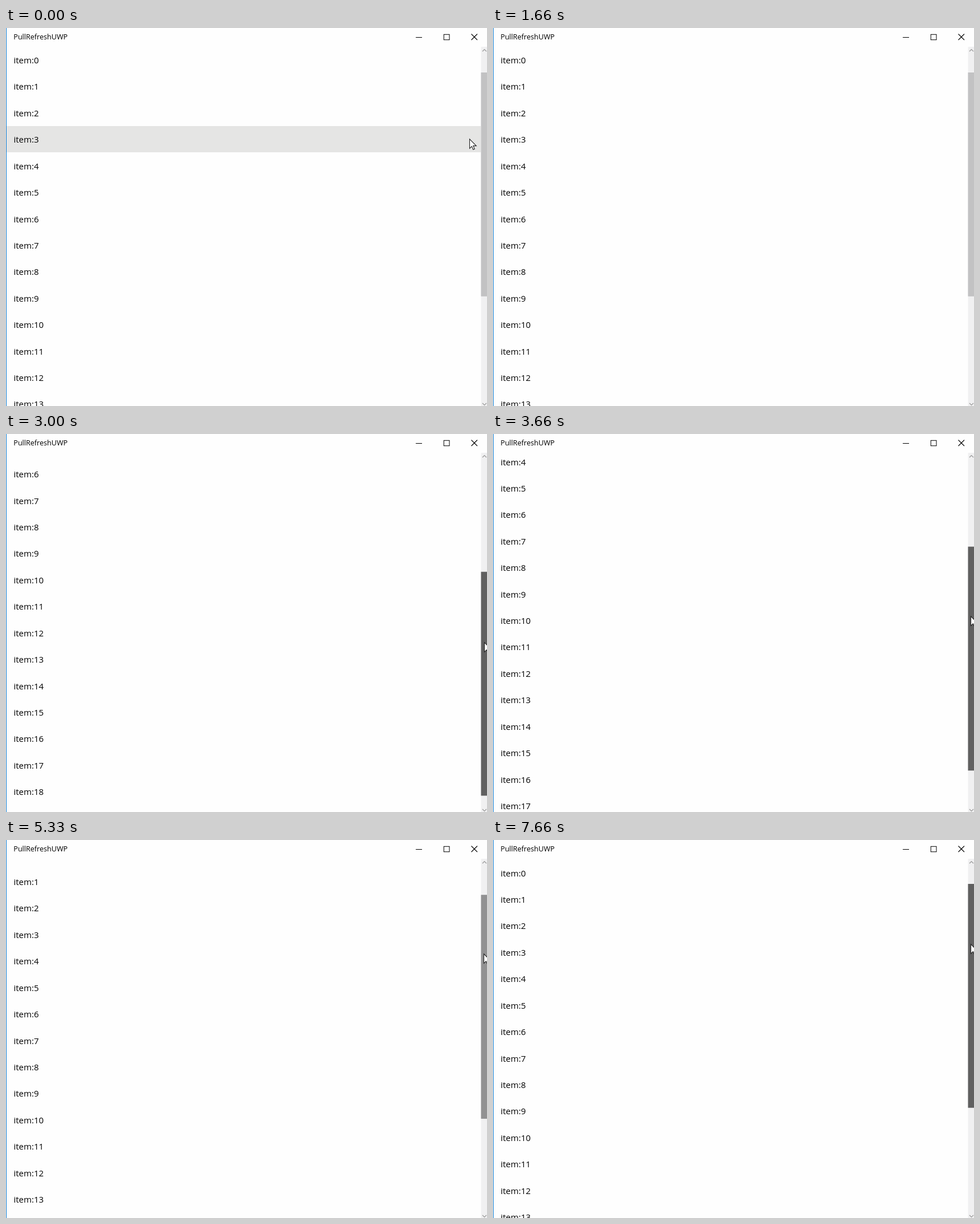
An HTML page with a canvas for the animation above (8000 ms loop, 844x663 px).

```html
<!DOCTYPE html>
<html lang="en">
<head>
<meta charset="utf-8">
<title>PullRefreshUWP</title>
<style>
html, body { margin: 0; width: 100%; height: 100%; overflow: hidden; background: #fefefe; }
canvas { display: block; }
</style>
</head>
<body>
<canvas id="stage" width="844" height="663"></canvas>
<script>
const ctx = document.getElementById('stage').getContext('2d');
const W = 844, H = 663, LOOP = 8000;
const TOP = 33, BAR = 833.5, THUMB = 392.7;
const ROWS = 20, PITCH = 46.42, RATIO = 1.615;
const SANS = '"Open Sans", "Noto Sans", sans-serif';
const CJK = '"Noto Sans CJK TC", "Noto Sans CJK", sans-serif';
const IDLE = '#c2c2c3', HOVER = '#919192', DRAG = '#606060';

// One step every third of a second: thumb top, thumb colour, cursor x, cursor y, hovered row
const steps = [
  [78, IDLE, 813, 194, 3],
  [78, HOVER, 840, 190],
  [78, HOVER],
  [78, IDLE, 825, 189, 3],
  [78, IDLE, 810, 193, 3],
  [78, IDLE],
  [78, HOVER, 839, 200],
  [78, DRAG, 839, 200],
  [171, DRAG, 839, 293],
  [241.7, DRAG, 839, 365],
  [261, DRAG, 839, 386],
  [197.6, DRAG, 838, 319],
  [144.2, DRAG, 838, 265],
  [111.4, DRAG, 837, 232],
  [96.2, DRAG, 837, 215],
  [96.2, IDLE, 820, 206, 4],
  [96.2, HOVER, 838, 199],
  [96.2, HOVER, 837, 198],
  [66, DRAG, 838, 169],
  [52, DRAG, 839, 155],
  [45.3, DRAG, 839, 147],
  [45.3, DRAG, 838, 145],
  [55, DRAG, 838, 160],
  [77, DRAG, 838, 182]
];

function rect(x, y, w, h, color) {
  ctx.fillStyle = color;
  ctx.fillRect(x, y, w, h);
}

function text(str, x, y, size, color = '#000', family = SANS) {
  ctx.font = `${size}px ${family}`;
  ctx.fillStyle = color;
  ctx.fillText(str, x, y);
}

function line(color, width, ...pts) {
  ctx.strokeStyle = color;
  ctx.lineWidth = width;
  ctx.beginPath();
  for (let i = 0; i < pts.length; i += 2) ctx.lineTo(pts[i], pts[i + 1]);
  ctx.stroke();
}

function drawTitleBar() {
  text('PullRefreshUWP', 13.3, 20, 12.6);
  line('#000', 1, 719, 16.5, 730, 16.5);
  ctx.strokeRect(768.3, 11.3, 9.7, 9.4);
  line('#000', 1.1, 816.5, 10.5, 827, 21);
  line('#000', 1.1, 827, 10.5, 816.5, 21);
}

function drawHeader(y) {
  text('放開以更新', 357, y - 61, 14.8, '#222', '300 ' + CJK);
  text('2/21/2016 8:34:55 PM', 356.7, y - 30, 20.15);
  line('#8a8a8a', 1, 314, y - 62.5, 327, y - 62.5);
  line('#8a8a8a', 1, 320.5, y - 41, 320.5, y - 60);
  line('#8a8a8a', 1, 314.5, y - 53, 320.5, y - 59.5, 326.5, y - 53);
}

function drawList(thumb, hovered) {
  const first = 57 - RATIO * (thumb - 78);
  ctx.save();
  ctx.beginPath();
  ctx.rect(1, TOP, BAR - 1, H - TOP);
  ctx.clip();
  drawHeader(Math.round(first));
  for (let i = 0; i < ROWS; i++) {
    const y = Math.round(first + i * PITCH);
    if (i === hovered) rect(1, y - 24, BAR - 1, 46, '#e5e5e4');
    text('item:' + i, 13.5, y + 5, 15);
  }
  ctx.restore();
}

function drawScrollBar(thumb, color) {
  rect(BAR, TOP, W - BAR, H - TOP, '#f0f0f1');
  rect(BAR, thumb, W - BAR, THUMB, color);
  line('#999', 1.2, 836, 41, 839.5, 37.5, 843, 41);
  line('#999', 1.2, 836, 658, 839.5, 661.5, 843, 658);
}

function drawCursor(x, y) {
  const shape = new Path2D('M.5.8V17.2L4.3 13.6 6.8 19.3 9.3 18.2 6.9 12.6H12.2Z');
  ctx.save();
  ctx.translate(x, y);
  ctx.fillStyle = '#fff';
  ctx.fill(shape);
  ctx.strokeStyle = '#222';
  ctx.lineWidth = 1.1;
  ctx.stroke(shape);
  ctx.restore();
}

function draw(t) {
  const tick = Math.ceil(3 * (Math.floor(t / 10) + 1) / 100) - 1;
  const [thumb, color, x, y, hovered] = steps[tick];
  rect(0, 0, W, H, '#fefefe');
  drawTitleBar();
  drawList(thumb, hovered);
  drawScrollBar(thumb, color);
  rect(0, 0, 1, H, '#1080d8');
  if (x) drawCursor(x, y);
}

const start = performance.now();
function loop() {
  draw((performance.now() - start) % LOOP);
  requestAnimationFrame(loop);
}
loop();
</script>
</body>
</html>
```
